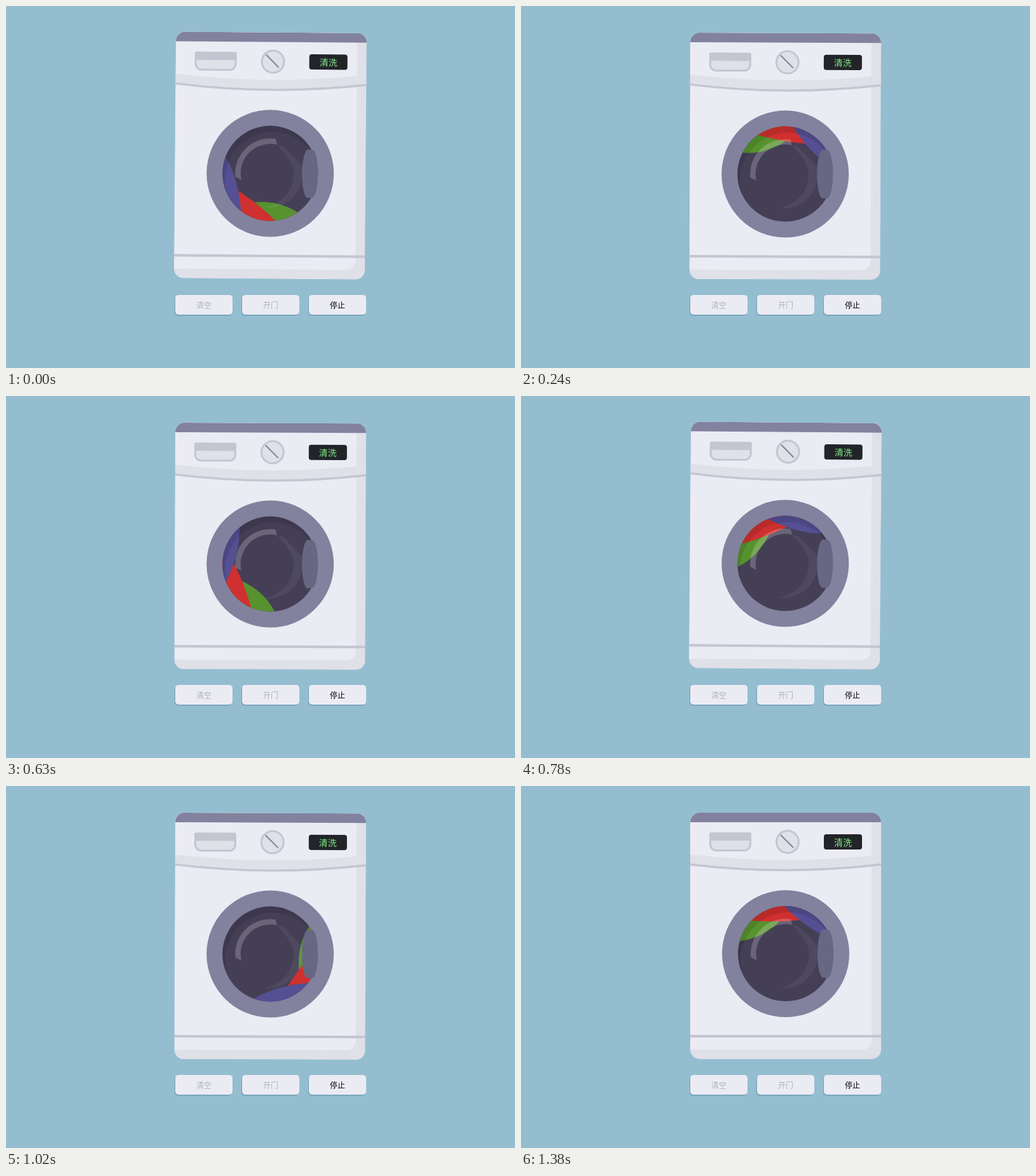
Recreate the animation shown at these times as an HTML page with a canvas. Size 800 by 570 pixels, loop 1.41 s.

```html
<!DOCTYPE html>
<html lang="zh-CN">
<head>
<meta charset="utf-8">
<title>洗衣机</title>
<style>
  html, body { margin: 0; width: 100%; height: 100%; overflow: hidden; background: #94bed0; }
  canvas { display: block; }
</style>
</head>
<body>
<canvas id="stage" width="800" height="570"></canvas>
<script>
const ctx = document.getElementById('stage').getContext('2d');
const FONT = '"Noto Sans CJK SC", "Noto Sans CJK", sans-serif';
const LOOP = 1410, STEP = 30, SHAKE = 97.5;
const C = {
  sky: '#94bed0', light: '#ebebf4', shade: '#dfe0e8', line: '#c5c5d2',
  slate: '#82829e', handle: '#676784', drum: '#453f56', screen: '#222428',
  green: '#57922f', red: '#d0302f', purple: '#554f93'
};

// Rows of [time, value...]
const SPIN = [[0, 106], [240, 258], [390, 338], [630, 496], [780, 587], [1020, 736], [1380, 967]];
// [phase, dx, dy, degrees]
const POSES = [[0, -0.5, -0.4, 0.46], [0.154, 0, 0, 0], [0.46, -0.7, 0.6, 0.22],
               [0.75, -0.7, 1, 0.5], [1, -0.5, -0.4, 0.46]];

function track(rows, at) {
  let i = 1;
  while (i < rows.length - 1 && rows[i][0] < at) i++;
  const a = rows[i - 1], b = rows[i];
  const k = (at - a[0]) / (b[0] - a[0]);
  return a.slice(1).map((v, j) => v + (b[j + 1] - v) * k);
}

const rad = deg => deg * Math.PI / 180;

function fill(color, shape) {
  ctx.fillStyle = color;
  if (typeof shape === 'string') return ctx.fill(new Path2D(shape));
  ctx.beginPath();
  shape();
  ctx.fill();
}

const rect = (color, x, y, w, h, r = 0) => fill(color, () => ctx.roundRect(x, y, w, h, r));
const disc = (color, x, y, r) => fill(color, () => ctx.arc(x, y, r, 0, 7));

function label(text, x, y, size, color) {
  ctx.font = `${size}px ${FONT}`;
  ctx.textAlign = 'center';
  ctx.textBaseline = 'alphabetic';
  ctx.fillStyle = color;
  ctx.fillText(text, x, y + size * 0.38);
}

function stroke(color, width, path) {
  ctx.strokeStyle = color;
  ctx.lineWidth = width;
  ctx.stroke(new Path2D(path));
}

function drawPanel() {
  rect(C.line, 296, 73, 66, 30, [3, 3, 11, 11]);
  rect(C.shade, 299, 86, 60, 14, [0, 0, 8, 8]);

  disc(C.line, 419, 88, 19);
  disc(C.shade, 419, 88, 16);
  stroke(C.slate, 2, 'M408 77L428 97');

  rect(C.screen, 476, 76, 60, 24, 4);
  label('清洗', 506, 88.5, 14, '#82ea88');
}

function drawCabinet() {
  ctx.beginPath();
  ctx.roundRect(266, 42, 300, 388, 15);
  ctx.save();
  ctx.clip();
  rect(C.shade, 266, 42, 300, 388);
  rect(C.light, 266, 42, 285, 373, [0, 0, 14, 0]);
  rect(C.slate, 266, 42, 300, 15);
  fill(C.shade, 'M266 108Q416 125 566 108V123.5Q416 141.5 266 123.5Z');
  stroke(C.line, 3.4, 'M264 123.3Q416 141.7 568 123.3');
  rect(C.line, 266, 392, 300, 4);
  ctx.restore();
}

function drawClothes(angle) {
  ctx.save();
  ctx.rotate(rad(angle));
  fill(C.green, 'M52 15Q35 -26 48 -63L70 -75L100 0Z');
  fill(C.red, 'M38 50Q48 10 70 -31L100 -20V40L60 60Z');
  fill(C.purple, 'M-6 76Q21 46 70 27L90 60L40 100H0Z');
  ctx.restore();
}

function drawGlass() {
  // Shadow cast by the rim
  ctx.fillStyle = 'rgba(0,0,0,.11)';
  ctx.beginPath();
  ctx.arc(0, 0, 77, 0, 7);
  ctx.moveTo(79, 10);
  ctx.arc(4, 10, 75, 0, 7);
  ctx.fill('evenodd');

  fill('rgba(255,255,255,.2)', () => {
    ctx.arc(0, 0, 55, rad(174), rad(278.5));
    ctx.arc(0, 0, 46.5, rad(283), rad(167), true);
  });
  fill('rgba(255,255,255,.05)',
    'M11 -45L20 -43L49 -14A54 54 0 0 1 -9 54Q36 42 37 -1Q36 -19 11 -45Z');
}

function drawDoor(angle) {
  ctx.save();
  ctx.translate(416, 264);
  disc(C.slate, 0, 0, 100);
  disc(C.drum, 0, 0, 75);
  ctx.save();
  ctx.beginPath();
  ctx.arc(0, 0, 75, 0, 7);
  ctx.clip();
  drawClothes(angle);
  drawGlass();
  ctx.restore();
  fill(C.handle, 'M59 -38H66A9 38 0 0 1 66 38H59A9 38 0 0 1 59 -38Z');
  ctx.restore();
}

function drawButton(text, x, color) {
  rect('#6f9db3', x - 1, 456.5, 90, 31, 5);
  rect(C.light, x, 455, 90, 31, 5);
  label(text, x + 45, 471, 12, color);
}

function draw(now) {
  const t = Math.floor(now % LOOP / STEP) * STEP;
  const [dx, dy, tilt] = track(POSES, t % SHAKE / SHAKE);
  const [angle] = track(SPIN, t);

  ctx.fillStyle = C.sky;
  ctx.fillRect(0, 0, 800, 570);

  ctx.save();
  ctx.translate(416 + dx, 236 + dy);
  ctx.rotate(rad(tilt));
  ctx.translate(-416, -236);
  drawCabinet();
  drawPanel();
  drawDoor(angle);
  ctx.restore();

  drawButton('清空', 266, '#b2b2b7');
  drawButton('开门', 371, '#b2b2b7');
  drawButton('停止', 476, '#000');
}

let start;
function tick(now) {
  start ??= now;
  draw(Math.max(0, now - start));
  requestAnimationFrame(tick);
}
draw(0);
requestAnimationFrame(tick);
</script>
</body>
</html>
```
